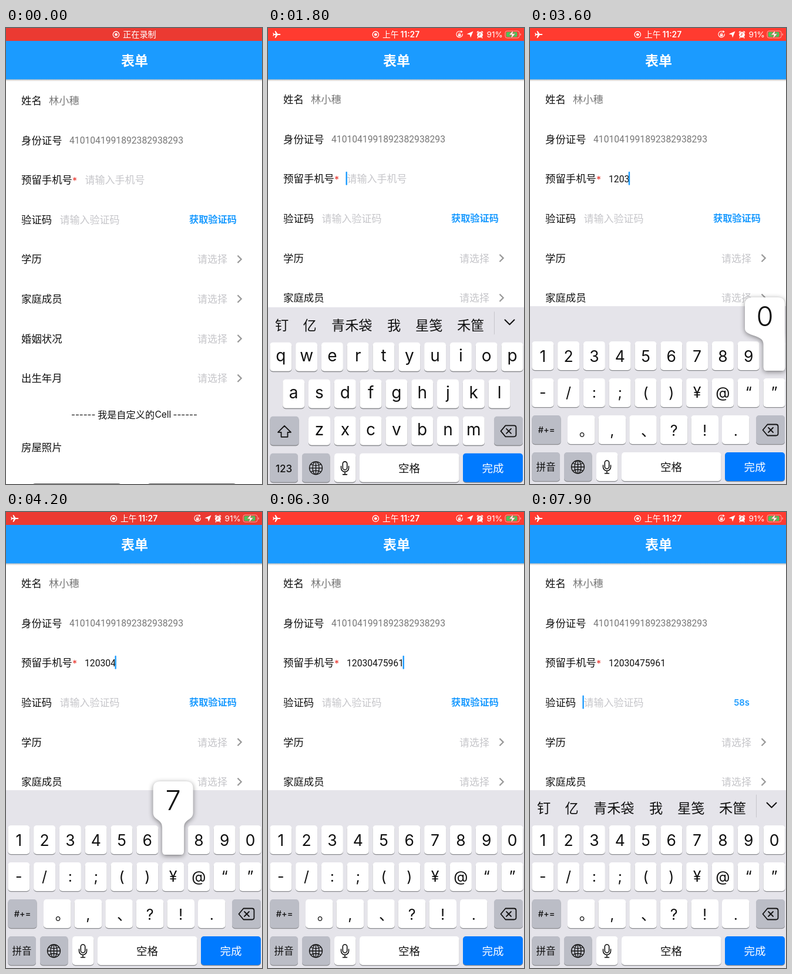
An HTML page that plays this animation: 436x777 px, repeating every 8 s.

```html
<!DOCTYPE html>
<html lang="zh-CN">
<head>
<meta charset="utf-8">
<title>表单</title>
<style>
html, body { margin: 0; width: 100%; height: 100%; overflow: hidden; background: #fff; }
svg { display: block; width: 100vw; height: 100vh; }
text { font-family: Inter, "Noto Sans CJK SC", "Noto Sans CJK", sans-serif; white-space: pre; }
.num { font-family: Roboto, "Liberation Sans", sans-serif; }
.line { fill: none; stroke-linecap: round; stroke-linejoin: round; }
.sharp { stroke-linecap: butt; stroke-linejoin: miter; }
#balloon { filter: drop-shadow(0 2px 4px rgba(0, 0, 0, .45)); }
</style>
</head>
<body>
<svg id="stage" viewBox="0 0 436 777"></svg>
<script>
const LOOP = 8000;
const BLUE = '#1b9bff', HINT = '#c6c6ca', INK = '#111', KEY_GRAY = '#bbbdc6';
const PHONE = '12030475961';
const KEY_TIMES = [2500, 2800, 3100, 3400, 3700, 4000, 4250, 4700, 5100, 5500, 5900];
const FOCUS = 1400, NUMERIC = 2200, SEND_CODE = 6450, CODE_FOCUS = 7500;
const DIGIT_W = 8.82, PITCH = 43.8, KEY_W = 37, KEY_H = 49;
const KEY_ROWS = [534, 597, 660, 723];

const text = (x, y, s, size, fill = INK, attrs = '') =>
  `<text x="${x}" y="${y}" font-size="${size}" fill="${fill}" ${attrs}>${s}</text>`;
const mid = (x, y, s, size, fill = INK, attrs = '') =>
  text(x, y, s, size, fill, 'text-anchor="middle" ' + attrs);
const line = (d, stroke, width, style = '') =>
  `<path class="line ${style}" d="${d}" stroke="${stroke}" stroke-width="${width}"/>`;
const group = (id, body) => `<g id="${id}">${body}</g>`;
const rowY = i => 121.6 + i * 67.63;

function form() {
  const thin = 'font-weight="350"', light = 'font-weight="300"';
  const labels = ['姓名', '身份证号', '预留手机号', '验证码', '学历', '家庭成员', '婚姻状况', '出生年月'];
  let out = labels.map((s, i) => text(26, rowY(i) + 6.5, s, 17.4, INK, thin)).join('');
  out += text(73, rowY(0) + 6.5, '林小穗', 17.2, '#777', light);
  out += text(108, rowY(1) + 5.7, '4101041991892382938293', 15.7, '#777', 'class="num"');
  out += text(113, rowY(2) + 7, '*', 16, '#e8342c');
  out += text(134.5, rowY(2) + 6.4, '请输入手机号', 17, HINT, 'id="phoneHint" ' + light);
  out += text(134, rowY(2) + 5.7, '', 15.7, INK, 'id="phone" class="num"');
  out += text(91.5, rowY(3) + 6.4, '请输入验证码', 17, HINT, light);
  out += text(312, rowY(3) + 6, '获取验证码', 16.2, BLUE, 'id="send" font-weight="700"');
  out += mid(360.5, rowY(3) + 5.2, '', 14.8, BLUE, 'id="count" font-weight="600"');
  for (let i = 4; i < 8; i++) {
    out += text(326, rowY(i) + 6.4, '请选择', 17, HINT, light);
    out += line(`M394.5 ${rowY(i) - 6.2}l6.2 6.2l-6.2 6.2`, '#999', 2.2, 'sharp');
  }
  out += text(111, 662.5, '------', 15) + text(156, 663, '我是自定义的', 16.2, INK, thin);
  out += text(253.5, 662.5, 'Cell', 15.5) + text(284.5, 662.5, '------', 15);
  out += text(26, 719.5, '房屋照片', 17.4, INK, thin);
  const photo = x => `<rect x="${x}" y="774.3" width="157" height="100" rx="8" fill="#666"/>`;
  out += group('photos', photo(42) + photo(238));
  out += `<rect id="cursor" width="2.4" height="23" rx="1" fill="${BLUE}"/>`;
  return out;
}

function statusIcons() {
  const w = '#fff';
  let out = `<path fill="${w}" d="M21.5 11Q21.5 10 19.5 10H16.5L13 5H11.6L13 10H10.5L9.3 8.3H8.3L9 11L8.3 13.7H9.3L10.5 12H13L11.6 17H13L16.5 12H19.5Q21.5 12 21.5 11Z"/>`;
  out += text(195, 16, '上午', 13.8, w, 'font-weight="500"') + text(225.5, 16, '11:27', 13.8, w, 'font-weight="600"');
  out += line('M329 6.4A5.2 5.2 0 1 0 331.2 10', w, 1.1) + `<path fill="${w}" d="M328.6 4L331.8 6.6L328.4 8.4Z"/>`;
  out += `<rect x="323.8" y="10.6" width="4.6" height="3.6" fill="${w}"/>` + line('M324.8 10.6V9.7a1.3 1.3 0 0 1 2.6 0V10.6', w, .9);
  out += `<path fill="${w}" d="M349.5 5.5L345 16.5L343.7 11.4L338.5 10.2Z"/>`;
  out += `<circle cx="361" cy="11.5" r="4.9" fill="${w}"/>` + line('M356.4 7.2l1.6-1.4M365.6 7.2l-1.6-1.4M357.8 16l-.6 .8M364.2 16l.6 .8', w, 1.6);
  out += line('M361 8.7V11.8L358.9 12.6', '#f33a31', 1.1);
  out += text(372.5, 16, '91%', 13.6, w);
  out += `<rect x="404" y="5" width="24" height="12" rx="3.3" fill="none" stroke="#fff" stroke-opacity=".55"/>
    <rect x="405.7" y="6.7" width="18.8" height="8.6" rx="1.8" fill="#4bc45c"/>
    <path d="M429.5 9V13Q431 12.4 431 11T429.5 9Z" fill="#fff" fill-opacity=".6"/>
    <path d="M418 3.5L410.5 11.8H415.3L413.4 18.5L421.3 9.8H416.5Z" fill="#fff" stroke="#e04438" stroke-width=".7"/>`;
  return out;
}

function header() {
  return `<rect y="22" width="436" height="69" fill="url(#shade)"/>
    <rect y="22" width="436" height="65.5" fill="${BLUE}"/>
    <rect id="bar" width="436" height="22"/>` +
    mid(219, 63.5, '表单', 23, '#fff', 'font-weight="700"') +
    group('record', '<circle r="5.2" fill="none" stroke="#fff" stroke-width="1.3"/><circle r="2.4" fill="#fff"/>') +
    text(199, 16, '正在录制', 14.2, '#fff', 'id="recording"') +
    group('status', statusIcons());
}

const cap = (x, row, w, fill = '#fff') =>
  `<rect x="${x}" y="${KEY_ROWS[row] + 1.3}" width="${w}" height="${KEY_H}" rx="5" fill="#8a8b8f"/>
   <rect x="${x}" y="${KEY_ROWS[row]}" width="${w}" height="${KEY_H}" rx="5" fill="${fill}"/>`;

// Items are characters or [character, horizontal nudge].
function keyRow(items, row, x0, size, base, pitch = PITCH, w = KEY_W) {
  return [...items].map((item, i) => {
    const [ch, dx] = Array.isArray(item) ? item : [item, 0];
    const x = x0 + i * pitch;
    return cap(x, row, w) + mid(x + w / 2 + dx, KEY_ROWS[row] + base, ch, size);
  }).join('');
}

function keyboard() {
  const medium = 'font-weight="500"';
  const letters = keyRow('qwertyuiop', 0, 3.3, 28, 32.5) + keyRow('asdfghjkl', 1, 25.2, 28, 32.5) +
    keyRow('zxcvbnm', 2, 69, 28, 32.5) + cap(3.5, 2, 49, KEY_GRAY) +
    line('M28 676L17 687H22.5V695H33.5V687H39Z', INK, 1.8) + mid(27, 755, '123', 17, INK, medium);
  const marks = [['。', 9], ',', ['、', 9], '?', '!', '.'];
  const numbers = keyRow('1234567890', 0, 3.3, 26.5, 34.5) + keyRow('-/:;()¥@“”', 1, 3.3, 25, 32.5) +
    keyRow(marks, 2, 64, 25, 34.5, 52.6, 46.6) + cap(3.5, 2, 49, KEY_GRAY) +
    mid(28, 690, '#+=', 14.5, INK, medium) + mid(27, 753.5, '拼音', 16.5, INK, medium);
  const words = [['钉', 12], ['亿', 59.5], ['青禾袋', 108], ['我', 203], ['星笺', 251], ['禾筐', 322]];
  const candidates = words.map(([s, x]) => text(x, 513, s, 23.2)).join('') +
    line('M385.5 482V520', '#c6c6cb', 1) + line('M403.5 495.5L411.5 503.5L419.5 495.5', INK, 2);
  const del = cap(385, 2, 49, KEY_GRAY) +
    line('M404.5 675.5H419Q422.5 675.5 422.5 679V691Q422.5 694.5 419 694.5H404.5L396.5 685Z', INK, 1.8) +
    line('M406 681l8 8M414 681l-8 8', INK, 1.8);
  const globe = line('M70.5 748a11 11 0 1 0 22 0a11 11 0 1 0-22 0M76 748a5.5 11 0 1 0 11 0a5.5 11 0 1 0-11 0M81.5 737V759M70.5 748H92.5M73 741.5Q81.5 746 90 741.5M73 754.5Q81.5 750 90 754.5', INK, 1.3);
  const mic = '<rect x="127.3" y="737" width="7.4" height="14" rx="3.7" fill="none" stroke="#111" stroke-width="1.6"/>' +
    line('M124.5 745V748A6.5 6.5 0 0 0 137.5 748V745M131 754.5V759M127.5 759H134.5', INK, 1.6);
  const bottom = cap(3.5, 3, 47.5, KEY_GRAY) + cap(58, 3, 47.5, KEY_GRAY) + cap(113, 3, 36.5) +
    cap(156, 3, 169.5) + cap(332, 3, 102, '#007aff') + globe + mic +
    mid(240.5, 755, '空格', 18.5) + mid(383, 755, '完成', 18.5, '#fff');
  return '<rect y="474" width="436" height="310" fill="#e5e4ea"/>' + bottom + del +
    group('letters', letters) + group('numbers', numbers) + group('candidates', candidates) +
    group('popup', '<path id="balloon" fill="#fff"/>' + mid(0, 508, '', 47, INK, 'id="popupDigit" font-weight="300"'));
}

document.getElementById('stage').innerHTML =
  `<defs><linearGradient id="shade" x1="0" y1="0" x2="0" y2="1">
    <stop offset=".94" stop-color="#777" stop-opacity=".55"/><stop offset="1" stop-color="#777" stop-opacity="0"/>
  </linearGradient></defs>
  <rect width="436" height="777" fill="#fff"/>` +
  group('form', form()) + group('keyboard', keyboard()) + group('header', header());

const el = id => document.getElementById(id);
const show = (id, on) => el(id).setAttribute('visibility', on ? 'visible' : 'hidden');
const move = (id, x, y) => el(id).setAttribute('transform', `translate(${x} ${y})`);

function drawPopup(digit) {
  const k = 3.3 + (+digit + 9) % 10 * PITCH, e = k + KEY_W;
  const l = Math.min(366, Math.max(2, k - 15.5)), r = l + 68;
  el('balloon').setAttribute('d', `M${l + 12} 459H${r - 12}Q${r} 459 ${r} 471V512C${r} 526 ${e} 522 ${e} 538
    V578Q${e} 584 ${e - 5} 584H${k + 5}Q${k} 584 ${k} 578V538C${k} 522 ${l} 526 ${l} 512V471Q${l} 459 ${l + 12} 459Z`);
  el('popupDigit').setAttribute('x', (l + r) / 2);
  el('popupDigit').textContent = digit;
}

function render(t) {
  const pulse = Math.min(1, Math.max(0, .5 + 1.6 * Math.cos(2 * Math.PI * (t / 1500 - .4))));
  el('bar').setAttribute('fill', `rgb(${235 + 20 * pulse},${58 + pulse},${50 - 2 * pulse})`);

  const started = t >= FOCUS;
  show('recording', !started);
  show('status', started);
  move('record', started ? 183.3 : 187.5, 11.2);

  move('form', 0, 1.8 * Math.exp(-t / 150));
  show('photos', t < 500);

  // Critically damped rise of the keyboard.
  const s = Math.max(0, t - FOCUS) * .018;
  move('keyboard', 0, 303 * (1 + s) * Math.exp(-s));
  show('keyboard', started);
  show('letters', started && t < NUMERIC);
  show('numbers', t >= NUMERIC);

  const typed = KEY_TIMES.filter(k => t >= k).length;
  const inCode = t >= CODE_FOCUS;
  el('phone').textContent = PHONE.slice(0, typed);
  show('phoneHint', !typed);
  show('candidates', started && (!typed || inCode));

  const pressed = KEY_TIMES.findIndex(k => t >= k - 130 && t < k);
  show('popup', pressed >= 0);
  if (pressed >= 0) drawPopup(PHONE[pressed]);

  const since = inCode ? CODE_FOCUS : typed ? KEY_TIMES[typed - 1] : FOCUS;
  show('cursor', started && (t - since) % 1000 < 500);
  el('cursor').setAttribute('x', inCode ? 89.4 : 132.5 + typed * DIGIT_W);
  el('cursor').setAttribute('y', rowY(inCode ? 3 : 2) - 12);

  const sent = t >= SEND_CODE;
  show('send', !sent);
  el('count').textContent = sent ? 59 - Math.floor((t - SEND_CODE) / 1000) + 's' : '';
}

const start = performance.now();
function tick() {
  render((performance.now() - start) % LOOP);
  requestAnimationFrame(tick);
}
tick();
</script>
</body>
</html>
```
